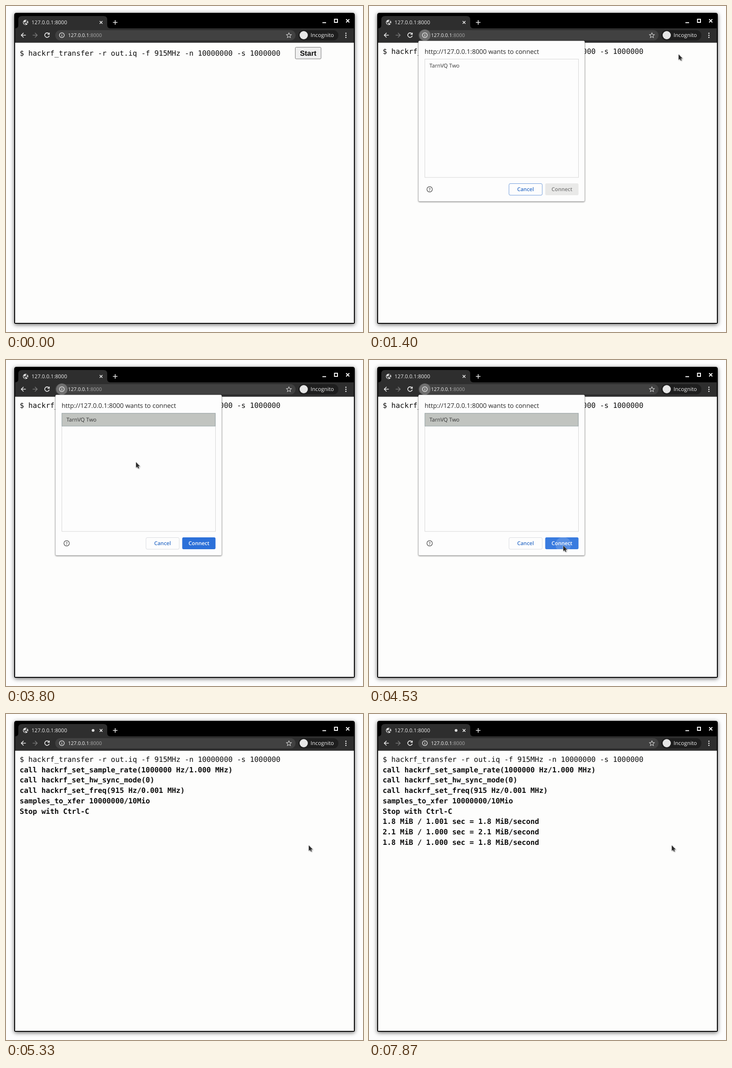
Animation, 783 px wide and 715 px high, one loop 8 s. Source, as an HTML page:

```html
<!DOCTYPE html>
<html lang="en">
<head>
<meta charset="utf-8">
<title>Radio transfer</title>
<style>
  html, body { margin: 0; width: 100%; height: 100%; overflow: hidden; background: #fdfdfd; }
  svg { display: block; width: 783px; height: 715px; }
  text { font-family: "Open Sans", "Noto Sans", sans-serif; font-size: 11.8px; text-rendering: geometricPrecision; white-space: pre; }
  .mono text { font-family: "DejaVu Sans Mono", monospace; font-size: 15.83px; fill: #0c0c0c; }
  .mono .out { font-weight: 700; }
  .window { filter: drop-shadow(0 2px 5px rgba(0, 0, 0, .6)); }
  .icon { fill: none; stroke: #ececec; stroke-width: 1.6; }
  .dialog-shape { fill: #fdfdfd; stroke: #bbb; stroke-width: .6; filter: drop-shadow(0 1px 1.5px rgba(0, 0, 0, .5)); }
  .label { font-weight: 600; font-size: 11.5px; text-anchor: middle; }
  #start text { font: 700 15.83px "Liberation Sans", Arial, sans-serif; text-anchor: middle; fill: #0c0c0c; }
</style>
</head>
<body>
<svg viewBox="0 0 783 715">
  <defs>
    <clipPath id="connectClip"><rect x="386.5" y="389" width="73" height="26" rx="3"/></clipPath>
  </defs>

  <!-- browser window -->
  <path class="window" d="M18 20q0-5 5-5H760q5 0 5 5V694q0 3-3 3H21q-3 0-3-3Z"/>
  <path fill="#2e2e2e" d="M20 49q7 0 7-7V30q0-8 8-8H214q8 0 8 8V42q0 7 7 7H763V80.500H20Z"/>
  <rect x="20" y="80.500" width="743" height="614.500" fill="#fdfdfc"/>

  <!-- tab strip -->
  <circle cx="43" cy="36" r="5.800" fill="#e4e4e4"/>
  <path fill="#2e2e2e" d="M38.500 34l3 2.500v2l1.500 1.500v1.200q-4.500-.8-4.500-7.200ZM43.500 31.500h2.800l1 2.500-2 .5-.8 2h2.800l.9 2.500-1 .8-1.500-1.800h-2.700l-1.800-2.500 2.300-1Z"/>
  <text x="56" y="40" font-size="11.500" style="font-size:11.5px" fill="#ececec">127.0.0.1:8000</text>
  <circle id="device" cx="191" cy="36" r="3" fill="#dcdcdc"/>
  <g class="icon">
    <path d="M205.500 33l6 6m0-6l-6 6M234.500 36h10m-5-5v10"/>
    <path stroke="#fff" stroke-width="2" d="M694 36.500h8M720.500 29h6.500v7h-6.500ZM746 29l7 7m0-7l-7 7"/>
  </g>

  <!-- toolbar -->
  <rect x="108" y="53" width="527" height="22.500" rx="11.200" fill="#414141"/>
  <rect x="641" y="53" width="88" height="22.500" rx="11.200" fill="#1e1e1e"/>
  <circle id="chip" cx="122.500" cy="64" r="12.500" fill="#707070"/>
  <g class="icon">
    <path d="M43.500 64H33.500m5-5l-5 5 5 5"/>
    <path stroke="#777" d="M58.500 64h10m-5-5l5 5-5 5"/>
    <path d="M94 60.800a5 5 0 1 0 .9 4.200M95 58.500v3.800h-4"/>
    <circle cx="122.500" cy="64" r="5.300" stroke-width="1.300"/>
    <path stroke-width="1.300" d="M122.500 63.300v3.700m0-6v1.300"/>
    <path stroke-width="1.100" stroke="#d0d0d0" d="M620.500 58.800l1.600 3.600 3.900.4-2.900 2.600.8 3.900-3.400-2-3.400 2 .8-3.900-2.900-2.600 3.900-.4Z"/>
  </g>
  <text x="136" y="68" style="font-size:10.95px" fill="#f4f4f4">127.0.0.1<tspan fill="#a4a4a4">:8000</tspan></text>
  <circle cx="653" cy="64" r="9" fill="#e6e6e6"/>
  <text x="668" y="68" fill="#f0f0f0">Incognito</text>
  <g fill="#ececec"><circle cx="745.500" cy="59.800" r="1.400"/><circle cx="745.500" cy="64.300" r="1.400"/><circle cx="745.500" cy="68.800" r="1.400"/></g>

  <!-- page -->
  <g class="mono" id="term"></g>
  <g id="start">
    <rect id="startBox" x="634.500" y="90.500" width="56.500" height="25.500" rx="2"/>
    <text x="662.800" y="109">Start</text>
  </g>

  <!-- device chooser -->
  <g id="dialog">
    <rect class="dialog-shape" x="108.500" y="76.500" width="364.500" height="352" rx="2.500"/>
    <text x="122" y="105" style="font-size:14px" fill="#262626">http://127.0.0.1:8000 wants to connect</text>
    <rect x="122.500" y="116.500" width="337" height="259.500" fill="none" stroke="#d6d6d6"/>
    <rect id="row" x="122.500" y="117" width="336.500" height="28" fill="#c1c4c0" stroke="#95a3a6"/>
    <text x="132.500" y="135" fill="#333">TarnVQ Two</text>
    <circle cx="133" cy="402" r="5.900" fill="none" stroke="#505050" stroke-width="1.300"/>
    <text x="133" y="405.500" class="label" style="font-size:9.5px" fill="#505050">?</text>
    <rect id="cancel" x="307" y="389.500" width="73" height="25.500" rx="3" fill="#fdfdfd"/>
    <text class="label" x="343.300" y="406" fill="#316fc8">Cancel</text>
    <rect id="connect" x="386.500" y="389" width="73" height="26" rx="3"/>
    <circle id="ripple" cx="426" cy="405" fill="#fff" clip-path="url(#connectClip)"/>
    <text id="connectText" class="label" x="423.200" y="406">Connect</text>
  </g>

  <path id="cursor" d="M0 0V12.200L2.800 9.700 4.700 13.800 6.700 12.900 4.900 9H8.600Z" fill="#2c2c2c" stroke="#f4f4f4" stroke-width="1" paint-order="stroke" style="filter:drop-shadow(1px 1px 1px rgba(0,0,0,.35))"/>
</svg>

<script>
const LOOP = 8000, FPS = 15;
const $ = id => document.getElementById(id);
const set = (id, attrs) => { for (const k in attrs) $(id).setAttribute(k, attrs[k]); };
const show = (id, on) => set(id, { visibility: on ? "visible" : "hidden" });
const ramp = (n, a, b) => Math.min(1, Math.max(0, (n - a) / (b - a)));
const ease = p => (1 - Math.cos(Math.PI * p)) / 2;

// [tick of appearance, text]; ticks are 1/15 s
const lines = [
  [0, "$ hackrf_transfer -r out.iq -f 915MHz -n 10000000 -s 1000000"],
  [72, "call hackrf_set_sample_rate(1000000 Hz/1.000 MHz)"],
  [72, "call hackrf_set_hw_sync_mode(0)"],
  [72, "call hackrf_set_freq(915 Hz/0.001 MHz)"],
  [72, "samples_to_xfer 10000000/10Mio"],
  [72, "Stop with Ctrl-C"],
  [88, "1.8 MiB / 1.001 sec = 1.8 MiB/second"],
  [103, "2.1 MiB / 1.000 sec = 2.1 MiB/second"],
  [118, "1.8 MiB / 1.000 sec = 1.8 MiB/second"]
];
lines.forEach(([, str], i) => {
  const el = document.createElementNS("http://www.w3.org/2000/svg", "text");
  el.id = "line" + i;
  el.textContent = str;
  if (i) el.setAttribute("class", "out");
  $("term").append(el);
  set(el.id, { x: 30, y: 105 + 22.7 * i });
});

// cursor moves: from tick, to tick, target
const moves = [
  [0, 8, 679, 106],
  [28, 41, 218, 137],
  [52, 65, 426, 407],
  [70, 80, 664, 288]
];

function cursorAt(n) {
  let x = 790, y = 260;
  for (const [a, b, tx, ty] of moves) {
    const p = ease(ramp(n, a, b));
    x += (tx - x) * p;
    y += (ty - y) * p;
  }
  return `translate(${x.toFixed(1)} ${y.toFixed(1)})`;
}

function draw(n) {
  show("cursor", n >= 1);
  set("cursor", { transform: cursorAt(n) });

  lines.forEach(([at], i) => show("line" + i, n >= at));
  const clicked = n >= 17, pressed = n === 15;
  set("line0", { y: clicked ? 105 : 109 });
  show("start", !clicked);
  set("startBox", {
    fill: pressed ? "#f5f5f5" : n >= 7 ? "#e5e5e5" : "#efefef",
    stroke: pressed ? "#8d8d8d" : "#767676"
  });

  const open = ramp(n, 17, 20) * (1 - ramp(n, 69, 72));
  set("dialog", { opacity: open });
  set("chip", { opacity: open });
  show("device", n >= 72);

  const picked = n >= 42, hover = n >= 64;
  show("row", picked);
  set("cancel", { stroke: n >= 41 ? "#dadce0" : "#6f9bdb" });
  set("connect", { fill: !picked ? "#e9e9e8" : hover ? "#397bdf" : "#2c70d9" });
  set("connectText", { fill: picked ? "#fdfdfd" : "#7c7c7c" });
  set("ripple", { r: 4 + 30 * ramp(n, 65, 72), opacity: n >= 66 ? .15 : 0 });
}

function tick() {
  const t = performance.now() % LOOP;
  draw(Math.floor((t + 5) * FPS / 1000) % (LOOP * FPS / 1000));
  requestAnimationFrame(tick);
}
tick();
</script>
</body>
</html>
```
